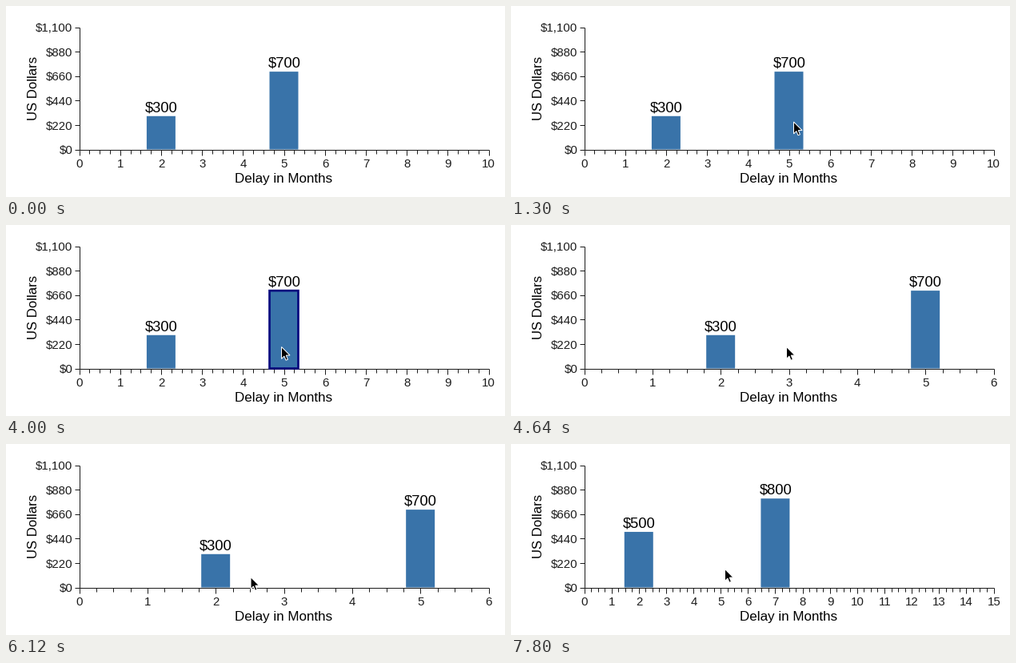
Animation, 624 px wide and 239 px high, one loop 8000 ms. Source, as a matplotlib script:

```python
import numpy as np
import matplotlib.pyplot as plt
from matplotlib.animation import FuncAnimation
from matplotlib.collections import LineCollection
from matplotlib.patches import Polygon, Rectangle

W, H, DPI = 624, 239, 64
PT = 72 / DPI  # points per pixel
STEP, LOOP = 20, 8000
LEFT, RIGHT, TOP, BASE = 91.5, 603.5, 26.5, 179.5
Y_MAX, BAR_W = 1100, 36
INK, BLUE, NAVY = "#1c1c1c", "#3973a9", "#00007d"

plt.rcParams["font.family"] = "Liberation Sans"
fig = plt.figure(figsize=(W / DPI, H / DPI), dpi=DPI, facecolor="white")
ax = fig.add_axes([0, 0, 1, 1])
ax.set_xlim(0, W)
ax.set_ylim(H, 0)
ax.axis("off")


def y_pos(value):
    return BASE + (TOP - BASE) * value / Y_MAX


def label(x, y, s, size, color="black", ha="center", **kw):
    return ax.text(x, y, s, size=size * PT, color=color, ha=ha,
                   va="baseline", **kw)


def lines(segments):
    return ax.add_collection(
        LineCollection(segments, colors=INK, linewidths=PT, zorder=3))


class Scene:
    """One choice: a month axis and two bars of (month, dollars)."""

    def __init__(self, months, bars):
        self.parts, self.outlines = [], []
        scale = (RIGHT - LEFT) / months
        ticks = []
        for q in range(months * 4 + 1):
            x = LEFT + scale * q / 4
            ticks.append([(x, BASE), (x, BASE + (5 if q % 4 else 7))])
            if q % 4 == 0:
                self.parts.append(label(x + 0.3, 202, str(q // 4), 15, INK))
        self.parts.append(lines(ticks))
        for month, dollars in bars:
            x, y = LEFT + scale * month, y_pos(dollars)
            box = (x - BAR_W / 2, y), BAR_W, BASE - y
            self.parts += [
                ax.add_patch(Rectangle(*box, fc=BLUE, lw=0, snap=False)),
                label(x + 0.3, y - 5.5, f"${dollars}", 18.4)]
            self.outlines.append(ax.add_patch(Rectangle(
                *box, fill=False, ec=NAVY, lw=2.6 * PT, snap=False, zorder=4)))

    def show(self, on, chosen=None):
        for part in self.parts:
            part.set_visible(on)
        for i, outline in enumerate(self.outlines):
            outline.set_visible(on and i == chosen)


# Fixed axes and titles
lines([[(LEFT, TOP), (LEFT, BASE)], [(LEFT, BASE), (RIGHT, BASE)]])
for v in range(0, Y_MAX + 1, Y_MAX // 5):
    y = y_pos(v)
    lines([[(LEFT - 6, y), (LEFT, y)]])
    label(83.5, y + 5.7, f"${v:,}", 15, INK, ha="right")
label(347.3, 221, "Delay in Months", 17)
label(39, 102.5, "US Dollars", 16.8, rotation=90, rotation_mode="anchor")

first, second, third = scenes = [
    Scene(10, [(2, 300), (5, 700)]),
    Scene(6, [(2, 300), (5, 700)]),
    Scene(15, [(2, 500), (7, 800)]),
]


def arrow(tilt=np.pi / 8):
    """Pointer outline: half an arrow mirrored about its tilted axis."""
    half = np.array([(0, 0), (13.8, 5.7), (12, 1.3), (17.6, 1.3)])
    along, across = np.vstack([half, half[:0:-1] * (1, -1)]).T
    c, s = np.cos(tilt), np.sin(tilt)
    return np.column_stack([along * s - across * c, along * c + across * s])


ARROW = arrow()
cursor = ax.add_patch(Polygon(ARROW, fc="black", ec="white", lw=PT,
                              joinstyle="miter", zorder=9))

# Pointer moves: (start, end, resting point, sideways bow on the way)
ENTRY = (57, 246)
moves = [
    (740, 1300, (353.5, 145), (0, -170)),
    (3520, 4000, (344.5, 152.5), (-137, 22)),
    (5080, 5280, (344.5, 167), (0, 0)),
    (5480, 5680, (341.5, 167), (0, 0)),
    (5940, 6320, (264.5, 159.5), (0, 3)),
    (6460, 6720, (267.5, 156.5), (0, 0)),
]


def tip(t):
    pos = np.array(ENTRY, float)
    for start, end, rest, bow in moves:
        u = np.clip((t - start) / (end - start), 0, 1)
        u = u * u * (3 - 2 * u)
        pos = pos + u * (rest - pos) + np.sin(np.pi * u) * np.array(bow)
    return pos


def draw(frame):
    t = frame * STEP
    first.show(t < 4640, 1 if t >= 3940 else None)
    second.show(4640 <= t < 7800, 0 if t >= 6220 else None)
    third.show(t >= 7800)
    cursor.set_xy(ARROW + tip(t))
    return []


anim = FuncAnimation(fig, draw, frames=LOOP // STEP, interval=STEP,
                     repeat=True, repeat_delay=0, blit=False)
plt.show()
```
